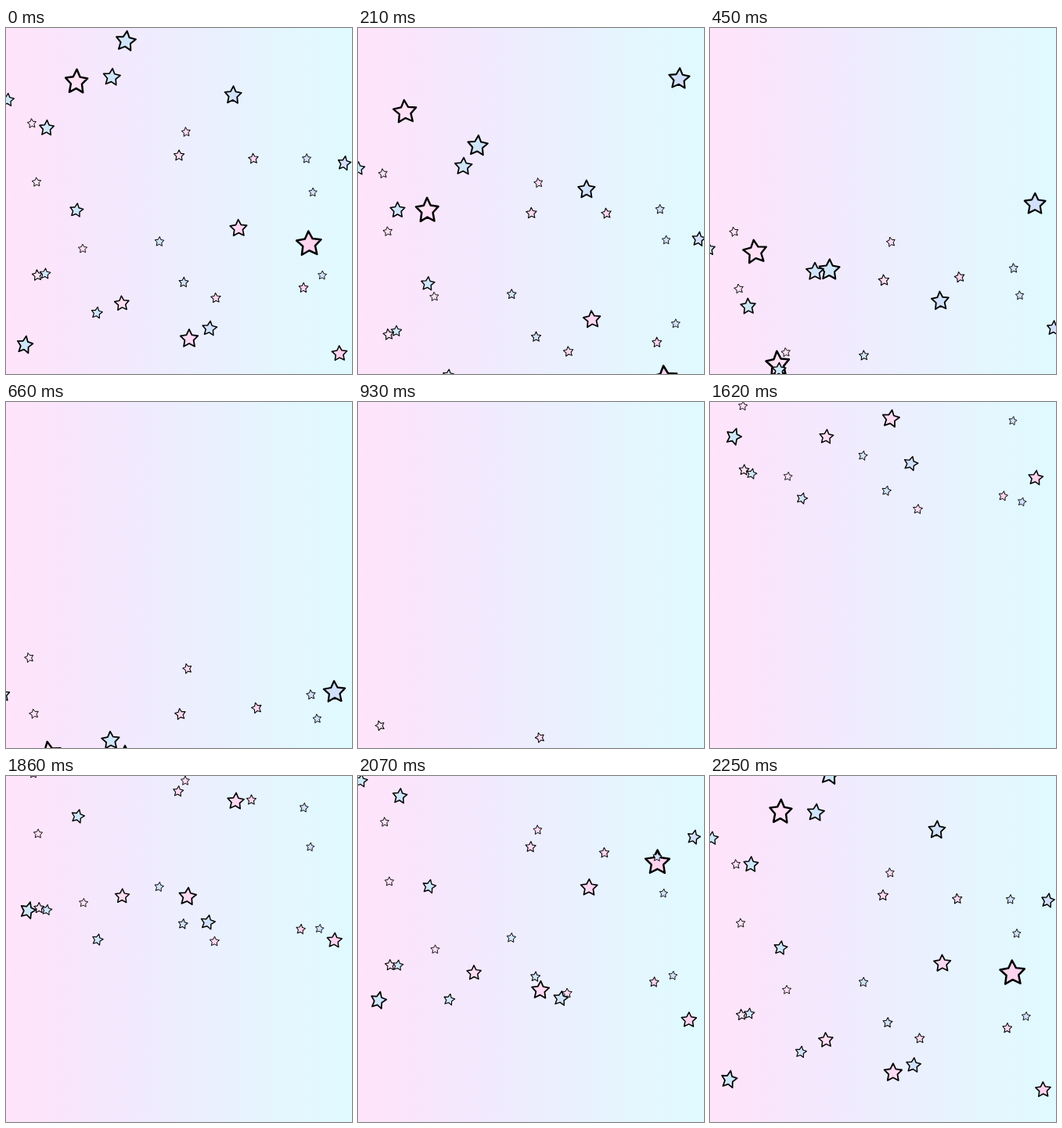
An HTML page with a canvas for the animation above (2280 ms loop, 442 px wide and 442 px high).

```html
<!DOCTYPE html>
<html lang="en">
<head>
<meta charset="utf-8">
<title>Falling stars</title>
<style>
  html, body { margin: 0; width: 100%; height: 100%; overflow: hidden; }
  canvas { display: block; }
</style>
</head>
<body>
<canvas id="stage" width="442" height="442"></canvas>
<script>
const SIZE = 442, STEP = 30, STEPS = 76, WRAP = 37;
const VANISH_X = 165, DEPTH = 1.27e-4; // stars grow and spread as they fall
const ctx = document.getElementById('stage').getContext('2d');

function gradient(...colors) {
  const g = ctx.createLinearGradient(0, 0, SIZE, 0);
  colors.forEach((c, i) => g.addColorStop(i / (colors.length - 1), c));
  return g;
}
const sky = gradient('#ffe4fb', '#f8e6fc', '#f0ebfe', '#eaf0fe', '#e4f6fe', '#dffaff');

// Each star: x and y at the start of the loop, pixels fallen per step.
// Size, outline, tilt, spin and sideways turn all follow from these.
const swarms = [
  {
    fill: gradient('#ffe4f7', '#ffd2ee'), tilt: -2,
    stars: [
      [90, 69, 22.6], [62, -43, 21.3], [33, 122, 8.8], [39, 197, 8.5],
      [98, 282, 8.1], [40, 316, 9.9], [148, 352, 13.3], [234, 397, 16.2],
      [268, 345, 8.9], [221, 163, 10], [230, 133, 8.9], [316, 167, 9.5],
      [297, 256, 15.4], [387, 276, 22.5], [380, 332, 9.1], [426, 416, 13.6]
    ]
  },
  {
    fill: gradient('#cfe8f9', '#d2dffb'), tilt: 6,
    stars: [
      [153, 17, 18.7], [135, 63, 15.8], [2, 92, 12.1], [52, 128, 14.3],
      [90, 233, 12.5], [24, 405, 15.5], [50, 314, 9.6], [116, 364, 10.3],
      [196, 273, 8.9], [227, 325, 9.1], [260, 384, 13.1], [290, 86, 16.6],
      [384, 167, 8.8], [392, 210, 8.2], [404, 316, 8.1], [432, 173, 13.1],
      [406, -70, 19.3]
    ]
  }
];

function starPath(radius, width) {
  ctx.beginPath();
  for (let i = 0; i < 10; i++) {
    const a = i * Math.PI / 5, r = i % 2 ? radius / 2 : radius;
    ctx.lineTo(Math.sin(a) * r * width, -Math.cos(a) * r);
  }
  ctx.closePath();
}

function drawStar([x0, y0, speed], fill, tilt, step) {
  const fallen = y0 / (1 + DEPTH * y0) + speed * step;
  const y = fallen / (1 - DEPTH * fallen);
  const scale = 1 + DEPTH * y;
  const x = VANISH_X + (x0 - VANISH_X) * scale / (1 + DEPTH * y0);
  const sway = Math.sin(x0 + y0);
  const turn = (tilt + 4 * sway - .4 * step) * Math.PI / 180;

  ctx.save();
  ctx.translate(x, y);
  ctx.rotate(turn);
  starPath(.71 * speed * scale, 1 - .1 * sway * sway);
  ctx.restore(); // fill in stage space, so the gradient spans the stage
  ctx.fillStyle = fill;
  ctx.fill();
  ctx.lineWidth = .108 * speed * scale;
  ctx.stroke();
}

function draw() {
  let step = Math.floor(performance.now() / STEP) % STEPS;
  if (step >= WRAP) step -= STEPS;
  ctx.fillStyle = sky;
  ctx.fillRect(0, 0, SIZE, SIZE);
  ctx.strokeStyle = '#000';
  ctx.lineJoin = 'round';
  for (const { fill, tilt, stars } of swarms)
    for (const star of stars) drawStar(star, fill, tilt, step);
  requestAnimationFrame(draw);
}
draw();
</script>
</body>
</html>
```
